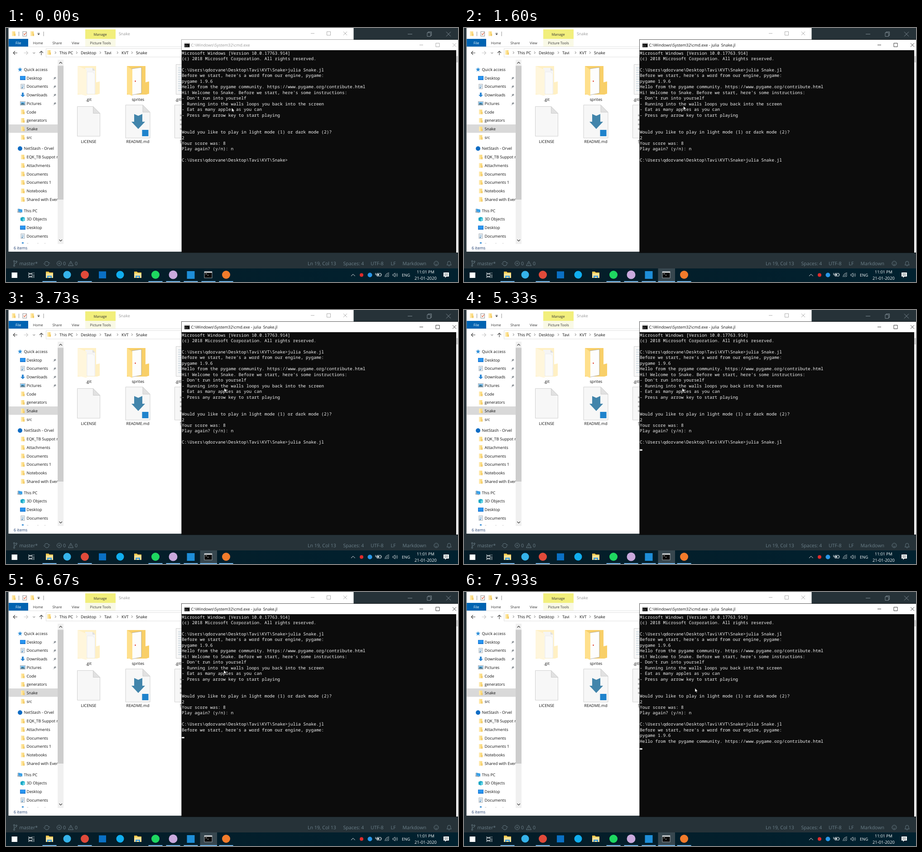
Animation, 998 px wide and 561 px high, one loop 8 s. Source, as an HTML page:

```html
<!DOCTYPE html>
<html lang="en">
<head>
<meta charset="utf-8">
<title>Terminal session</title>
<style>
html, body { margin: 0; width: 100%; height: 100%; overflow: hidden; background: #263238; }
svg { display: block; width: 998px; height: 561px; }
text { font-family: "Open Sans", "Noto Sans", sans-serif; font-size: 8.9px; white-space: pre; text-rendering: geometricPrecision; }
.mono { font-family: "Noto Sans Mono", "DejaVu Sans Mono", monospace; font-size: 9.52px; fill: #f4f4f4; }
</style>
</head>
<body>
<svg id="stage" viewBox="0 0 998 561" xmlns="http://www.w3.org/2000/svg"></svg>
<script>
const LOOP = 8000, ROW = 12.47, CHAR = 5.712, LEFT = 388;
const PROMPT = 'C:\\Users\\qdorvane\\Desktop\\Tavi\\KVT\\Snake>';
const COMMAND = 'julia Snake.jl';
const TITLE = 'C:\\Windows\\System32\\cmd.exe';
const GREETING = [
  "Before we start, here's a word from our engine, pygame:",
  'pygame 1.9.6',
  'Hello from the pygame community. https://www.pygame.org/contribute.html'
];
const HISTORY = [
  'Microsoft Windows [Version 10.0.17763.914]',
  '(c) 2018 Microsoft Corporation. All rights reserved.', '',
  PROMPT + COMMAND, ...GREETING,
  "Hi! Welcome to Snake. Before we start, here's some instructions:",
  "- Don't run into yourself",
  '- Running into the walls loops you back into the screen',
  '- Eat as many apples as you can',
  '- Press any arrow key to start playing', '', '',
  'Would you like to play in light mode (1) or dark mode (2)?', '2',
  'Your score was: 8', 'Play again? (y/n): n', ''
];

// SVG markup helpers
const esc = s => s.replace(/&/g, '&amp;').replace(/</g, '&lt;').replace(/>/g, '&gt;');
const rect = (x, y, w, h, fill, extra = '') => `<rect x="${x}" y="${y}" width="${w}" height="${h}" fill="${fill}" ${extra}/>`;
const disc = (x, y, r, fill) => `<circle cx="${x}" cy="${y}" r="${r}" fill="${fill}"/>`;
const shape = (d, fill, extra = '') => `<path d="${d}" fill="${fill}" ${extra}/>`;
const line = (d, stroke, w = 1, extra = '') => `<path d="${d}" fill="none" stroke="${stroke}" stroke-width="${w}" ${extra}/>`;
const text = (s, x, y, fill = '#111', size = 8.9, extra = '') => `<text x="${x}" y="${y}" fill="${fill}" style="font-size:${size}px" ${extra}>${esc(s)}</text>`;
const centred = (s, x, y) => text(s, x, y, '#111', 8.8, 'text-anchor="middle"');
const mono = (s, row, id = '') => `<text class="mono" ${id && `id="${id}"`} x="${LEFT}" y="${58.5 + row * ROW}">${esc(s)}</text>`;
const at = (x, y, body) => `<g transform="translate(${x} ${y})">${body}</g>`;

const controls = (y, [min, max, close], color, r = 4) =>
  line(`M${min - r} ${y}h${2 * r}M${max - r} ${y - r}h${2 * r}v${2 * r}h${-2 * r}z` +
       `M${close - r} ${y - r}l${2 * r} ${2 * r}m0 ${-2 * r}l${-2 * r} ${2 * r}`, color, .8);

// Small icons, drawn around their own centre
const icons = {
  folder: () => rect(-3.8, -5, 7.2, 10, '#fbdc83') + rect(-3.8, -5, 2.6, 10, '#ffeaae') + rect(1.8, 0, 2.2, 5, '#f0c560'),
  star: () => shape('M0-5 1.4-1.6 5-1.4 2.2.9 3.1 4.5 0 2.5-3.1 4.5-2.2.9-5-1.4-1.4-1.6Z', '#2f8fd8'),
  desktop: () => rect(-6, -4.5, 12, 9, '#1976d2') + rect(-5, -3.5, 10, 6, '#2997f2'),
  document: () => rect(-4, -5, 8, 10, '#fff', 'stroke="#8795a1" stroke-width=".8"') + line('M-2.5-2.5h5M-2.5-.5h5M-2.5 1.5h5', '#5d93bf', .8) + rect(-2.5, 2, 3, 2, '#5d93bf'),
  download: () => shape('M-2-5H2V0H5L0 5-5 0H-2Z', '#2d86d3'),
  picture: () => rect(-5.5, -4, 11, 8, '#fff', 'stroke="#8795a1" stroke-width=".8"') + rect(-4.5, -3, 9, 3, '#60b0e6') + shape('M-4.5 3V1L-1-1 4.5 1V3Z', '#3a718e'),
  cloud: () => disc(0, 0, 5, '#0f6cc4'),
  computer: () => shape('M-4-4.5 5-2.5V4L-4 2Z', '#3ba0e6') + shape('M-6 2 3 4 2 5-6 3.5Z', '#7a8894') + rect(-5.5, -4, 2, 6, '#a8b4be'),
  cube: () => shape('M-5-3 0-5 5-3V3L0 5-5 3Z', '#1aa7c4') + shape('M0-1 5-3V3L0 5Z', '#61d3e6'),
  pin: () => shape('M0-4 4 0 2.5.5.5 2.5 0 4-4 0-2.5-.5-.5-2.5Z', '#8a9096', 'transform="scale(.75)"') + line('M-1.5 1.5-4 4', '#8a9096', .8)
};

function editorBackdrop() {
  const dim = '#6b7f89';
  const label = (s, x) => text(s, x, 524, dim, 10.6);
  return rect(0, 0, 998, 561, '#263238') +
    line('M887 13.500h10M972 8.500l10 10m0-10l-10 10M930 10.500h7.500v8h-7.500zM932 10.500v-2h7.500v8h-2', '#87959c', .9) +
    line('M18 516v8M23 517v1c0 3-5 2-5 4', dim, .9) +
    [[18, 515], [18, 525], [23, 516]].map(([x, y]) => `<circle cx="${x}" cy="${y}" r="1.5" fill="#263238" stroke="${dim}" stroke-width=".9"/>`).join('') +
    label('master*', 29.5) +
    line('M85 519a5 5 0 0 1 9-1M95 521a5 5 0 0 1-9 2M83 520l2 2 2-2M93 520l2-2 2 2', dim) +
    line('M112.500 520a5 5 0 1 0 10 0a5 5 0 1 0-10 0M115.500 518l4 4m0-4l-4 4', dim, .9) + label('0', 126) +
    line('M143 515l5.500 10h-11zM143 518.500v3M143 523v1', dim, .9) + label('0', 152) +
    label('Ln 19, Col 13', 666) + label('Spaces: 4', 744.5) + label('UTF-8', 805) + label('LF', 849.5) + label('Markdown', 875.5) +
    line('M945 520a5 5 0 1 0 10 0a5 5 0 1 0-10 0M947.500 521.500q2.500 3 5 0M948 518v1M952 518v1', dim, .9) +
    line('M973.500 523.500q1.500-2 1.500-5a3.300 3.300 0 0 1 6.600 0q0 3 1.500 5zM977 525.500h2.500', dim, .9);
}

function sidebar() {
  const groups = [
    [91.7, 'star', 'Quick access', ['desktop Desktop', 'document Documents', 'download Downloads', 'picture Pictures', 'folder Code', 'folder generators', 'folder Snake', 'folder src']],
    [266.2, 'cloud', 'NetStash - Orvel', ['folder EQK_TB Suppot r', 'folder Attachments', 'folder Documents', 'folder Documents 1', 'folder Notebooks', 'folder Shared with Everyone']],
    [403.5, 'computer', 'This PC', ['cube 3D Objects', 'desktop Desktop', 'document Documents', 'download Downloads']]
  ];
  let out = rect(6, 213, 108, 18.5, '#d9d9d9');
  for (const [top, icon, name, items] of groups) {
    out += at(31, top, icons[icon]()) + text(name, 39.5, top + 3.2, '#111', 8.8);
    items.forEach((item, i) => {
      const y = top + 18.72 * (i + 1), cut = item.indexOf(' ');
      out += at(37, y, icons[item.slice(0, cut)]()) + text(item.slice(cut + 1), 45.5, y + 3.2, '#111', 8.8);
      if (icon === 'star' && i < 4) out += at(108, y, icons.pin());
    });
  }
  return `<g clip-path="url(#side)">${out}</g>` +
    rect(114, 70, 13, 407, '#f0f0f0') + rect(114, 83.5, 13, 295.5, '#cdcdcd') +
    line('M117.500 78.500l3.200-3.200 3.200 3.200M117.500 467.500l3.200 3.200 3.200-3.200', '#444', 1.2);
}

function bigFolder(x, faded) {
  const [back, flap] = faded ? ['#fff0c4', '#fff6dc'] : ['#f8cf68', '#ffe08c'];
  const sheets = faded
    ? shape('M18 5H34L40 11V62H18Z', '#f5f5f5') + shape('M34 5V11H40Z', '#dedede') + shape('M22 14H34L39 19V63H22Z', '#fafafa', 'stroke="#e4e4e4" stroke-width=".6"')
    : shape('M12 7 33 4V61L12 65Z', '#fdfdfd', 'stroke="#8c8c8c" stroke-width=".6"') + rect(18.5, 33, 2, 3, '#e0412f');
  const edge = faded ? 21 : 13;
  return at(x, 83, shape('M1 1H42V50L50 53V62L44 64H1Z', back) + sheets + shape(`M1 1 ${edge} 9V67L1 62Z`, flap) + shape('M42 37 50 35V61L42 64Z', back));
}

const page = (x, y, w, h, fold) => shape(`M${x} ${y}h${w - fold}l${fold} ${fold}v${h - fold}h${-w}z`, '#f7f7f7', 'stroke="#c6c6c6" stroke-width=".8"') +
  shape(`M${x + w - fold} ${y}v${fold}h${fold}z`, '#e1e1e1', 'stroke="#c6c6c6" stroke-width=".8"');

function files() {
  return bigFolder(157, true) + bigFolder(266, false) +
    page(157.5, 173.5, 50, 65.5, 15) + page(264, 170, 54, 73, 16) +
    shape('M283 190l9 4 9-4v17h6l-15 16-15-16h6z', '#4285ab') +
    rect(300.5, 225, 14, 14, '#1f83cc') +
    page(375.5, 80.5, 50, 66, 15) + page(372.5, 170, 54, 73, 16) +
    line(Array.from({ length: 11 }, (_, i) => `M380 ${88 + 5 * i}h8`).join(''), '#9db6c8', .8) +
    [191, 201, 211, 221].map(y => rect(384, y, 4, 4, '#b8b8b8')).join('') +
    centred('.git', 182.5, 161) + centred('sprites', 291.5, 161) +
    centred('LICENSE', 182.5, 254) + centred('README.md', 291, 254) +
    text('.gitignore', 373.5, 161) + text('Snake.jl', 384, 254);
}

function explorer() {
  const tab = (s, x, y = 35.5, fill = '#333') => text(s, x, y, fill, 7.8);
  const crumbs = [['This PC', 118], ['Desktop', 165], ['Tavi', 217], ['KVT', 255], ['Snake', 287]];
  return rect(5.5, 0, 762, 494, '#fff') +
    at(17, 12.5, icons.folder()) + line('M28.500 8v10M83 8v10', '#777', .8) +
    rect(37, 8, 8.5, 10, '#fff', 'stroke="#777" stroke-width=".8"') + line('M39 12.500l2 2.500 3.500-5', '#d9512c', 1.2) +
    at(58, 12.5, icons.folder()) + line('M69.500 11.500h5', '#333', .9) + shape('M69.500 13h5l-2.500 2.700z', '#333') +
    rect(175, 3, 67, 21, '#f2ef7c') + tab('Manage', 193.5, 17) + text('Snake', 249, 15.8, '#999') +
    controls(12, [677, 712.5, 749], '#999', 4) +
    rect(6, 24, 43, 17, '#0063b1') + rect(175, 24, 67, 17, '#f9f9e6') +
    tab('File', 21, 35.5, '#fff') + tab('Home', 59.5) + tab('Share', 102.5) + tab('View', 145) + tab('Picture Tools', 185.5) +
    rect(6, 41, 761, .8, '#dadbdc') +
    line('M25 55h-9m4-4l-4 4 4 4', '#444', 1.1) + line('M39.500 55h9m-4-4l4 4-4 4', '#c8c8c8', 1.1) +
    line('M59.500 54l2.300 2.300 2.300-2.300', '#555', 1) + line('M78 60v-9m-4 4l4-4 4 4', '#444', 1.1) +
    rect(88.5, 45.5, 678, 18.5, '#fff', 'stroke="#d9d9d9" stroke-width=".8"') + at(95, 54, icons.folder()) +
    crumbs.map(([s, x]) => line(`M${x - 10} 52l2.500 2.500-2.500 2.500`, '#555', .9) + text(s, x, 57.8)).join('') +
    sidebar() + files() + text('6 items', 17, 489, '#1e3c6e');
}

function taskbar() {
  const folder = x => at(x, 545, shape('M-8-7H-2L0-5H8V7H-8Z', '#f6c94f') + rect(-8, -3, 16, 10, '#ffe394') + shape('M-5 7V2H5V7H2.500V4.500H-2.500V7Z', '#3a9be0'));
  const light = '#e6eaec';
  return rect(0, 531, 998, 30, 'url(#bar)') +
    rect(12.5, 540, 12.5, 12, '#fff') +
    line('M50 540v2h8v-2M50 552v-2h8v2M50 543.500h8v5h-8zM61.500 540v2M61.500 544v8', light) +
    `<g id="active">${rect(428.5, 531, 37.5, 30, '#37474f')}</g>` +
    folder(96) + disc(135, 545, 8.5, '#35b3ea') + disc(174, 545, 9, '#e04a3a') +
    rect(205, 537.5, 16, 15.5, '#0a70c4') + disc(252, 545, 8.5, '#10aeef') + folder(291) +
    disc(330, 545, 9, '#1ed760') + disc(369, 545, 9.5, '#c9a9dd') + rect(399.5, 537, 17, 17, '#1e8ed8') +
    rect(438, 538, 17, 14, '#0a0a0a', 'stroke="#b9bfc3" stroke-width=".8"') + rect(438, 538, 17, 2.5, '#dfe3e5') + line('M440.500 543h3M445 546h2', '#fff') +
    disc(486, 545, 9, '#f27b2b') +
    [96, 174, 330, 369, 408, 447, 486].map(x => rect(x - 15.5, 559, 31, 2, '#76b9ed')).join('') +
    `<g id="activeLine">${rect(428.5, 559, 37.5, 2, '#76b9ed')}</g>` +
    line('M762 548l4.300-4.300 4.300 4.300', light) + disc(785, 545.5, 4, '#e02b2b') + disc(803.5, 545.5, 5, '#2997e8') +
    line('M819 542h9v6h-9zM829 544v2M816 541v4h3', light) + rect(820, 543.5, 4, 3, light) +
    line('M837 550a9 9 0 0 1 9-9M840 550a6 6 0 0 1 6-6M843 550a3 3 0 0 1 3-3', light, .9) +
    line('M854 544h2l3-3v9l-3-3h-2zM861 543.500q1.500 2 0 4M863 541.500q3 4 0 8', light, .8) +
    text('ENG', 874, 549, '#fff') + text('11:01 PM', 907, 541.5, '#fff', 9) + text('21-01-2020', 902, 555.5, '#fff', 9.4) +
    shape('M966 540h12v9h-6l-2.500 3v-3h-3.500z', '#fff') + line('M968 543h8M968 546h8', '#061a23', .8);
}

function terminal() {
  const buttons = color => controls(37.5, [917, 953, 990], color);
  return rect(388, 26, 610, 470, '#fff') +
    rect(387.5, 25.5, 612, 471, 'none', 'id="frame" stroke="#000"') +
    rect(394, 33, 11.5, 9.5, '#0a0a0a', 'stroke="#999" stroke-width=".5"') + rect(394, 33, 11.5, 1.8, '#cfcfcf') +
    text('C:\\', 395.3, 40.5, '#fff', 4.8) +
    '<text id="title" x="408.5" y="41"></text>' +
    `<g id="idle">${buttons('#999')}</g><g id="focused">${buttons('#111')}</g>` +
    rect(388, 49, 606, 447, '#0c0c0c') + rect(994, 49, 4, 447, '#f0f0f0') + rect(994, 62, 4, 14, '#cdcdcd') +
    HISTORY.map((s, i) => mono(s, i)).join('') + mono(PROMPT, 19, 'prompt') +
    GREETING.map((s, i) => mono(s, 20 + i, 'reply' + i)).join('') +
    '<rect id="caret" width="5.7" height="3" fill="#f2f2f2"/>';
}

const stage = document.getElementById('stage');
stage.innerHTML = `<defs><clipPath id="side">${rect(6, 66, 108, 410, '#000')}</clipPath>` +
  '<linearGradient id="bar"><stop stop-color="#051c27"/><stop offset="1" stop-color="#01212f"/></linearGradient></defs>' +
  editorBackdrop() + explorer() + terminal() + taskbar() +
  shape('M0 0V8.600L2 6.800 3.400 9.700 4.700 9.100 3.400 6.300H6Z', '#fff', 'id="pointer" stroke="#000" stroke-width=".5"');
const $ = id => document.getElementById(id);
const show = (id, on) => $(id).setAttribute('visibility', on ? 'visible' : 'hidden');

// Each entry holds from its start time until the next one
const POINTER = [
  [0, 498.5, 176.5], [70, 490, 174], [130, 484.5, 172.5], [3330, 483, 172.5], [3470, 482, 172.5], [5730, 481, 172.5],
  [7330, 485, 177], [7400, 492, 185], [7470, 499, 194], [7530, 505, 201], [7600, 509, 206], [7670, 510, 208], [7930, 510, 212.5]
];
// time, row, column; a missing row hides the caret
const CARET = [
  [0], [1070, 19, 41], [1330, 19, 55], [1600], [2130, 20, 0], [2670], [3200, 20, 0], [3730], [4270, 20, 0],
  [4800], [5330, 20, 0], [5870], [6400, 20, 0], [6530, 20, 55], [6670, 21, 0], [7270], [7470, 23, 0]
];
const current = (track, t) => track.findLast(key => key[0] <= t);

function render(t) {
  const focused = t >= 600;
  const title = $('title');
  title.textContent = TITLE + (t >= 1600 ? ' - julia  Snake.jl' : '');
  title.setAttribute('fill', focused ? '#111' : '#999');
  $('frame').setAttribute('stroke-opacity', focused ? .65 : .35);
  show('idle', !focused);
  show('focused', focused);
  show('active', focused);
  show('activeLine', focused);
  $('prompt').textContent = PROMPT + (t >= 1330 ? COMMAND : '');
  show('reply0', t >= 6530);
  show('reply1', t >= 7470);
  show('reply2', t >= 7470);

  const [, row, column] = current(CARET, t);
  show('caret', row !== undefined);
  if (row !== undefined) {
    $('caret').setAttribute('x', LEFT + column * CHAR);
    $('caret').setAttribute('y', 58.3 + row * ROW);
  }
  const [, x, y] = current(POINTER, t);
  $('pointer').setAttribute('transform', `translate(${x} ${y})`);
}

const start = performance.now();
function tick() {
  render((performance.now() - start) % LOOP);
  requestAnimationFrame(tick);
}
render(0);
requestAnimationFrame(tick);
</script>
</body>
</html>
```
